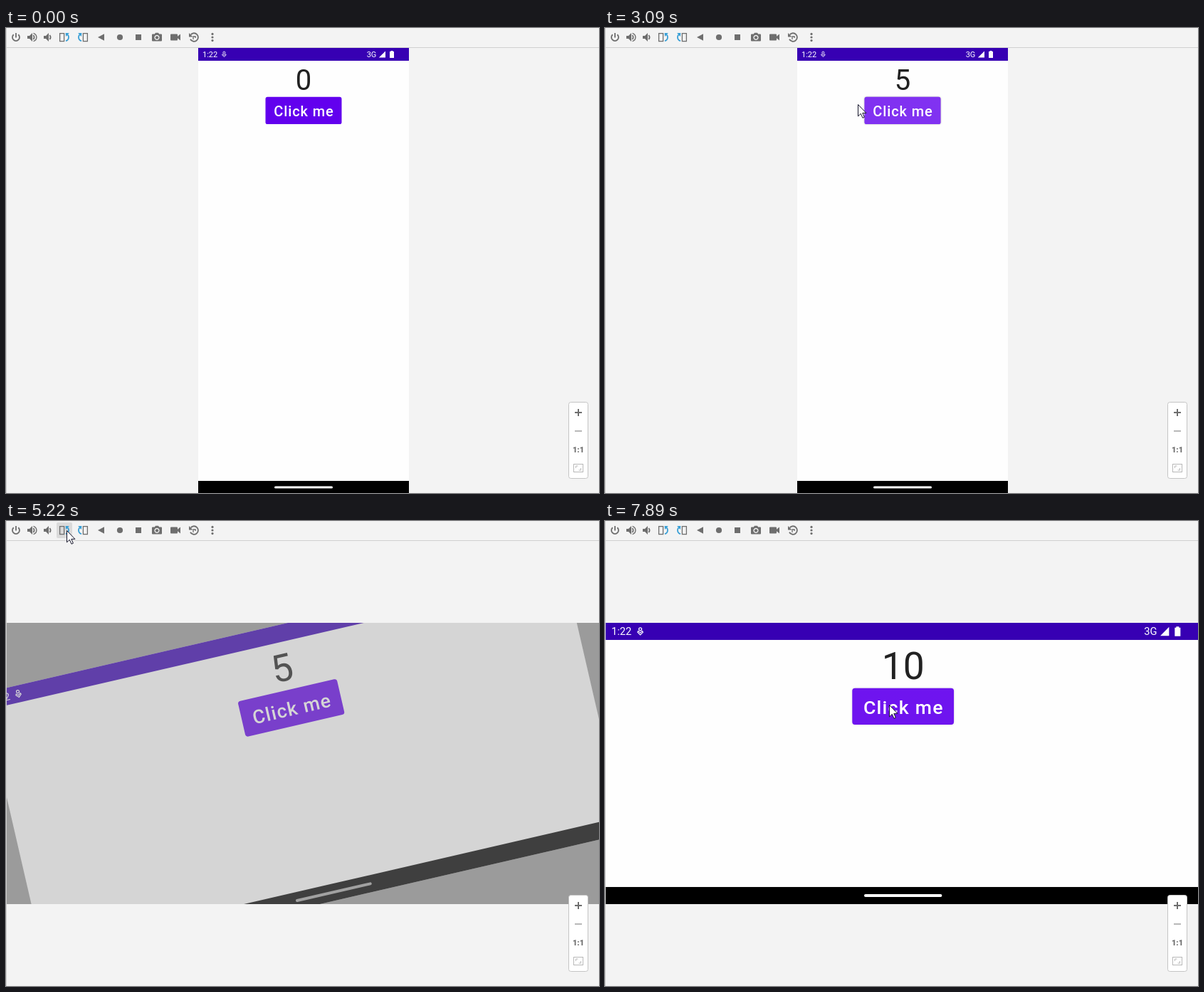
Animation of 833 by 653 pixels, one loop 8000 ms. Source, as an HTML page:

```html
<!DOCTYPE html>
<html lang="en">
<head>
<meta charset="utf-8">
<title>Counter rotation</title>
<style>
  html, body { margin: 0; width: 100%; height: 100%; overflow: hidden; background: #f3f3f3; }
  svg { display: block; }
  text { font-family: Roboto, sans-serif; }
  .count { font-size: 40px; fill: #212121; text-anchor: middle; }
  .label { font-size: 20px; font-weight: 500; letter-spacing: .9px; fill: #fff; text-anchor: middle; }
  .status { font-size: 11px; fill: #fff; }
  .line { fill: none; stroke: #6e6e6e; stroke-width: 1.8; }
  .blue { fill: none; stroke: #389fd6; stroke-width: 1.8; }
</style>
</head>
<body>
<svg width="833" height="653" viewBox="0 0 833 653">
  <defs>
    <radialGradient id="soft">
      <stop offset=".65" stop-color="#fff"/>
      <stop offset="1" stop-color="#fff" stop-opacity="0"/>
    </radialGradient>
    <clipPath id="wide"><rect x="1" y="143" width="832" height="395"/></clipPath>
    <g id="speaker"><path d="M0 11h3l4-4v12l-4-4H0z"/><path class="line" d="M8.3 10q2.6 3 0 6" stroke-width="1.5"/></g>
    <g id="turn">
      <rect class="line" x="75.6" y="7.6" width="6" height="11" style="stroke-width:1.3"/>
      <path class="blue" d="M84 18.2q4-1 4-5.4 0-2.2-1.6-3.6"/>
      <path fill="#389fd6" d="M83.6 7h5.2l-4.6 5z"/>
    </g>
  </defs>
  <rect width="833" height="653" fill="#f3f3f3"/>

  <g id="tall"></g>
  <g clip-path="url(#wide)">
    <rect id="backdrop" x="1" y="143" width="832" height="395" fill="#9b9b9b"/>
    <g id="flat"></g>
  </g>

  <rect width="833" height="27" fill="#f3f3f3"/>
  <path d="M0 27.5h833M.5 0v653" stroke="#d0d0d0"/>
  <rect id="hover" y="2" width="22" height="22" rx="2" fill="#dadada"/>

  <g fill="#6e6e6e">
    <path class="line" d="M10.8 9.2a5 5 0 1 0 6.4 0M14 7v6.5"/>
    <use href="#speaker" x="30"/>
    <path class="line" d="M38.5 7.3q4.4 1.6 4.4 5.7t-4.4 5.7" style="stroke-width:1.4"/>
    <use href="#speaker" x="53"/>
    <use href="#turn"/>
    <use href="#turn" transform="matrix(-1 0 0 1 190 0)"/>
    <path d="M129 13l9-4.8v9.6z"/>
    <circle cx="160" cy="13" r="4.1"/>
    <path d="M182 9h8v8h-8z"/>
    <path fill-rule="evenodd" d="M206 8.5h2.8l1.2-1.7h4l1.2 1.7h2.8q1 0 1 1v8q0 1-1 1h-12q-1 0-1-1v-8q0-1 1-1zM212 9.8a3.6 3.6 0 1 0 .01 0z"/>
    <circle cx="212" cy="13.4" r="2.2"/>
    <path d="M232 8.5h8q1 0 1 1v2.2l4-3.2v9l-4-3.2v2.2q0 1-1 1h-8q-1 0-1-1v-7q0-1 1-1z"/>
    <path class="line" d="M259.6 9.4a5.8 5.8 0 1 1-.6 6.4"/>
    <path d="M257 7v5.5h5.5z"/>
    <path class="line" d="M263 16v-4h3.2v2" style="stroke-width:1.3"/>
    <circle cx="290" cy="8.4" r="1.6"/><circle cx="290" cy="13" r="1.6"/><circle cx="290" cy="17.6" r="1.6"/>
  </g>

  <rect x="790.5" y="525.5" width="27" height="107" rx="3" fill="#fff" stroke="#c4c4c4"/>
  <path class="line" d="M799 540h10M804 535v10" style="stroke-width:2"/>
  <g fill="none" stroke="#b8b8b8">
    <path d="M799 566h10" stroke-width="2"/>
    <rect x="797.5" y="612.5" width="13" height="11"/>
    <path d="M800.5 618v-3h3M807.5 618v3h-3"/>
  </g>
  <text x="804" y="596" text-anchor="middle" font-size="11" font-weight="900" fill="#6e6e6e">1:1</text>

  <path id="cursor" d="M.5.5v16.4l3.8-3.6 2.7 6 2.4-1.1-2.6-5.8h5.1z" fill="#fff" stroke="#15152a"/>
</svg>
<script>
const $ = id => document.getElementById(id);
const LOOP = 8000, ZOOM = 395 / 296;
const clicks = { tall: [1890, 2090, 2285, 2540, 2790], flat: [6570, 6700, 6960, 7230, 7490] };

// Bursts of screen updates: first, last, number of steps
const bursts = [[560, 1490, 8], [1890, 2820, 8], [2940, 3930, 8], [4050, 4170, 2],
  [4440, 4440, 1], [5220, 6180, 8], [6570, 7500, 8], [7620, 7890, 3]];

// Pointer path: time, x, y
const path = [[560, 160, 357], [960, 312, 216], [1250, 395, 144], [1490, 422, 118],
  [2820, 422, 118], [3240, 315, 100], [3647, 191, 65], [3930, 107, 22], [4050, 92, 16],
  [4170, 86, 13], [4440, 85, 13], [5220, 85, 13], [5357, 84, 12], [5770, 245, 140],
  [6050, 378, 242], [6180, 399, 258], [LOOP, 399, 258]];

function screen(id, w, h) {
  const mid = w / 2;
  const button = `x="${mid - 53.5}" y="68.8" width="107" height="38.3" rx="2.9"`;
  $(id).innerHTML = `
    <clipPath id="${id}Button"><rect ${button}/></clipPath>
    <rect width="${w}" height="${h}" fill="#fefefe"/>
    <rect width="${w}" height="18" fill="#3700b3"/>
    <text class="status" x="6" y="13.1">1:22</text>
    <g fill="none" stroke="#fff" stroke-width=".9">
      <circle cx="36.4" cy="6.6" r="1.5"/>
      <path d="M34.2 8.7l-.6 1.1 2.8 2.8 2.8-2.8-.6-1.1-2.2 1.8z"/>
    </g>
    <text class="status" x="${w - 59.3}" y="13">3G</text>
    <path fill="#fff" d="M${w - 33} 4.4v9.2h-9.2zM${w - 27} 5h1.5v-1h3v1h1.5v9h-6z"/>
    <text class="count" x="${mid}" y="58.9"></text>
    <rect class="button" ${button} fill="#6200ee"/>
    <g clip-path="url(#${id}Button)">${clicks[id].map(() =>
      `<circle cx="${mid}" cy="88" fill="url(#soft)"/>`).join('')}</g>
    <text class="label" x="${mid + .45}" y="96">Click me</text>
    <rect y="${h - 18}" width="${w}" height="18"/>
    <rect class="pill" x="${mid - 41}" y="${h - 10.5}" width="82" height="3" rx="1.5" fill="#fff"/>`;
}
screen('tall', 296, 626);
screen('flat', 626, 296);

function snap(t) {
  let last = 0;
  for (const [from, to, n] of bursts) {
    if (t < from) break;
    const gap = (to - from) / (n - 1) || 1;
    last = from + Math.min(n - 1, Math.floor((t - from) / gap + 1e-6)) * gap;
  }
  return last;
}

function pointer(t) {
  const i = Math.max(1, path.findIndex(p => p[0] >= t));
  const [a, b] = [path[i - 1], path[i]];
  const k = (t - a[0]) / (b[0] - a[0]);
  return [a[1] + (b[1] - a[1]) * k, a[2] + (b[2] - a[2]) * k];
}

function ripples(id, t) {
  let press = 0;
  $(id).querySelectorAll('g > circle[fill]').forEach((circle, i) => {
    const age = t - clicks[id][i];
    const fade = age < 0 ? 0 : Math.min(1, .3 + age / 100, Math.max(0, (475 - age) / 225));
    circle.setAttribute('r', Math.max(0, Math.min(90, 15 + age / 4)));
    circle.setAttribute('opacity', .24 * fade);
    press = Math.max(press, fade);
  });
  $(id).querySelector('.button').style.filter =
    press ? `drop-shadow(0 .8px 1.2px rgba(0,0,0,${.35 * press}))` : 'none';
}

function draw(t) {
  const wide = t >= 4440, landscape = t >= 5220, turning = landscape && t < 5300;
  const count = [...clicks.tall, ...clicks.flat].filter(c => c <= t).length;
  document.querySelectorAll('.count').forEach(e => e.textContent = count);
  ripples('tall', t);
  ripples('flat', t);

  $('tall').style.display = landscape ? 'none' : '';
  $('tall').setAttribute('transform', wide
    ? `translate(1 538) rotate(-90) scale(${ZOOM})` : 'translate(270 28)');
  $('backdrop').style.display = turning ? '' : 'none';
  $('flat').style.display = landscape ? '' : 'none';
  $('flat').setAttribute('opacity', turning ? .59 : 1);
  $('flat').setAttribute('transform',
    `rotate(${turning ? -13 : 0} 418.5 340.5) translate(1 143) scale(${ZOOM})`);
  $('flat').querySelector('.pill').setAttribute('opacity', t < 5480 ? .65 : 1);

  const [x, y] = pointer(t);
  $('cursor').style.display = t < 560 ? 'none' : '';
  $('cursor').setAttribute('transform', `translate(${Math.round(x)} ${Math.round(y)})`);
  const spot = [71, 97].find(left => t > 3000 && y < 24 && x >= left && x < left + 22);
  $('hover').style.display = spot ? '' : 'none';
  if (spot) $('hover').setAttribute('x', spot);
}

const start = performance.now();
function tick() {
  draw(snap((performance.now() - start) % LOOP));
  requestAnimationFrame(tick);
}
tick();
</script>
</body>
</html>
```
